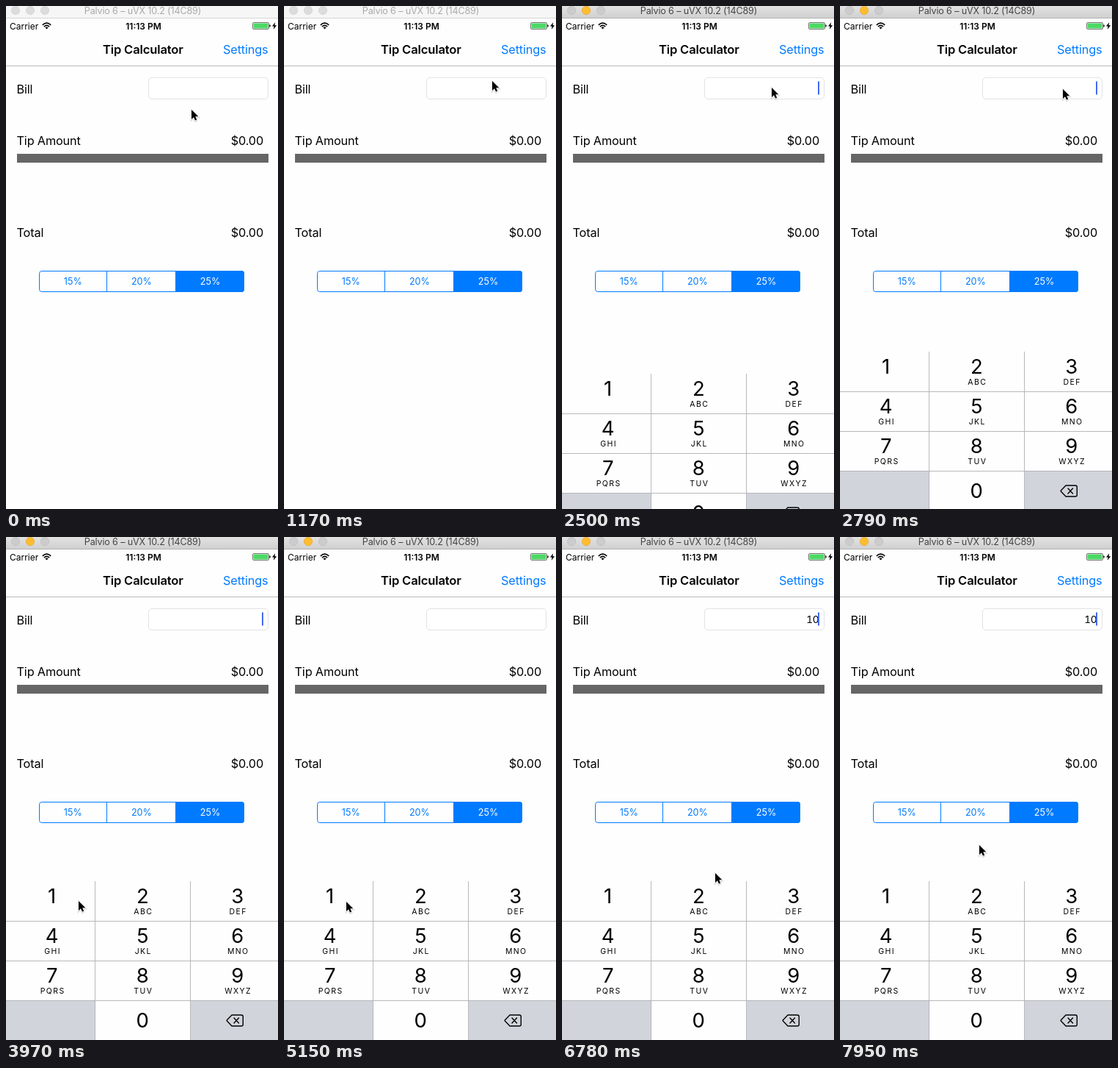
Recreate the animation shown at these times as an HTML page. Size 371 by 684 pixels, loop 8000 ms.

```html
<!DOCTYPE html>
<html lang="en">
<head>
<meta charset="utf-8">
<title>Tip Calculator</title>
<style>
  html, body { margin: 0; width: 100%; height: 100%; overflow: hidden; background: #fefefe; }
  svg { display: block; width: 371px; height: 684px; font: 16.3px Inter, "Open Sans", sans-serif; letter-spacing: -.01em; }
  .title { font-size: 12.6px; }
  .status { font-size: 12px; letter-spacing: 0; }
  .bold { font-weight: 600; }
  .nav { font-size: 16.6px; }
  .segment { font-size: 12.6px; letter-spacing: 0; }
  .field { font-size: 13.6px; font-variant-numeric: tabular-nums; }
  .digit { font-size: 27.5px; letter-spacing: 0; }
  .letters { font-size: 10.5px; letter-spacing: 1.4px; }
  .mid { text-anchor: middle; }
  .end { text-anchor: end; }
  .blue { fill: #007aff; }
</style>
</head>
<body>
<svg viewBox="0 0 371 684">
  <defs>
    <linearGradient id="chrome" x2="0" y2="1">
      <stop stop-color="#e3e2e3"/><stop offset="1" stop-color="#d1d0d1"/>
    </linearGradient>
    <path id="arrow" d="M0 0V13L3 10.200L5 14.600L7.200 13.700L5.300 9.300H9.300Z"/>
  </defs>
  <rect width="371" height="684" fill="#fefefe"/>

  <rect id="bar" width="371" height="16"/>
  <path id="barLine" d="M0 16.5H371"/>
  <g id="lights" stroke-width=".6"></g>
  <text id="title" class="title mid" x="186.5" y="11">Palvio 6 – uVX 10.2 (14C89)</text>

  <text class="status" x="5" y="31.5">Carrier</text>
  <g fill="none" stroke="#000" stroke-width="1.6">
    <path d="M49.8 25.8Q55.5 20.6 61.2 25.8M51.9 28.1Q55.5 24.8 59.1 28.1"/>
    <path d="M53.4 29.3Q55.5 27.6 57.6 29.3L55.5 31.5Z" fill="#000" stroke="none"/>
  </g>
  <text class="status bold mid" x="187.5" y="31.5">11:13 PM</text>
  <rect x="336.5" y="22.5" width="22" height="9" rx="1.5" fill="none" stroke="#555" stroke-width=".8"/>
  <rect x="337.5" y="23.5" width="20" height="7" rx=".5" fill="#4cd964"/>
  <path d="M359.3 25.3q1.6 .3 1.6 1.7t-1.6 1.7z"/>
  <path d="M367.2 22.2L363 27.6H365.6L364.8 31.8L369.2 26.2H366.5Z"/>

  <text class="bold nav mid" x="186.8" y="65">Tip Calculator</text>
  <text class="blue end" x="357.5" y="65">Settings</text>
  <path d="M0 81.5H371" stroke="#b9b9bb"/>

  <g id="rows"></g>
  <rect x="194.5" y="97.5" width="163" height="29" rx="4.5" fill="#fff" stroke="#e2e2e2"/>
  <text id="amount" class="field end" x="350.5" y="117"></text>
  <rect id="caret" x="349" y="102.5" width="2" height="18" fill="#426bf2"/>
  <rect x="15" y="201" width="343" height="12" fill="#676667"/>
  <g id="segments"></g>
  <g id="keyboard"></g>

  <g id="cursor">
    <use href="#arrow" y="1" stroke="#000" stroke-width="2.4" opacity=".14"/>
    <use href="#arrow" stroke="#fff" stroke-width="1.6" stroke-linejoin="round" paint-order="stroke"/>
  </g>
</svg>
<script>
const LOOP = 8000, STEP = 147.1;              // the picture changes once per step
const ACTIVE = 15, SHOW = 16;
const PRESSES = [{ step: 37, key: 1 }, { step: 43, key: 0 }];
const KEY_GRAY = "#d1d5db", KEY_WHITE = "#fefefe";
const KEY_TOP = 468, KEY_HEIGHT = 54;

// Places the pointer visits: arrival step, position, and the step it leaves again.
const stop = (at, x, y, leave = at) => ({ at, x, y, leave });
const STOPS = [
  stop(0, 253, 141),
  stop(2, 247, 106, 3),
  stop(6, 272, 109, 7),
  stop(10.5, 331, 76),
  stop(14, 267, 108, 15),
  stop(19, 304, 113),
  stop(27, 99, 495),
  stop(31, 85, 496, 36),
  stop(38, 94, 502, 39),
  stop(43, 174, 643, 44),
  stop(46, 209, 457, 47),
  stop(51, 183, 418),
  stop(54, 190, 419)
];

const $ = id => document.getElementById(id);
const set = (id, name, value) => $(id).setAttribute(name, value);
const clamp = v => Math.max(0, Math.min(1, v));
const ease = f => f * f * (3 - 2 * f);
const text = (cls, x, y, content, extra = "") => `<text class="${cls}" x="${x}" y="${y}" ${extra}>${content}</text>`;

function buildForm() {
  $("lights").innerHTML = [13, 33, 53].map(x => `<circle cx="${x}" cy="6" r="5.7"/>`).join("");
  $("rows").innerHTML = text("", 14.5, 118.5, "Bill") +
    [["Tip Amount", 188.5], ["Total", 313.5]].map(([label, y]) =>
      text("", 14.5, y, label) + text("end", 351, y, "$0.00")).join("");
  $("segments").innerHTML = `
    <rect x="45.5" y="360.5" width="279" height="28" rx="3.2" fill="none" stroke="#007aff"/>
    <path d="M137.5 360V389" stroke="#007aff"/>
    <path d="M231 360H321.3a3.700 3.700 0 0 1 3.700 3.700V385.300a3.700 3.700 0 0 1-3.700 3.700H231Z" class="blue"/>` +
    ["15%", "20%", "25%"].map((label, i) =>
      text("segment mid", 91.3 + 93.6 * i, 379, label, `fill="${i === 2 ? "#fff" : "#007aff"}"`)).join("");
}

function buildKeyboard() {
  const letters = ["", "ABC", "DEF", "GHI", "JKL", "MNO", "PQRS", "TUV", "WXYZ"];
  const centers = [62.7, 186.3, 315.7];
  const key = (n, row, col, label, base) => {
    const y = row * KEY_HEIGHT;
    return `<rect id="key${n}" x="${130 * col - 8}" y="${y}" width="130" height="${KEY_HEIGHT}" fill="${KEY_WHITE}"/>` +
      text("digit mid", centers[col], y + base, n) + text("letters mid", centers[col] + 1, y + 45, label);
  };
  const lines = [1, 2, 3].map(i => `M0 ${i * KEY_HEIGHT + .5}H371`).join("") + "M121.5 0V216M251.5 0V216";
  $("keyboard").innerHTML = `<rect width="371" height="216" fill="${KEY_GRAY}"/>` +
    letters.map((label, i) => key(i + 1, Math.floor(i / 3), i % 3, label, 30)).join("") +
    key(0, 3, 1, "", 37) +
    `<path d="${lines}" stroke="#b0b1b5" stroke-width=".9"/>
    <g fill="none" stroke="#000" stroke-width="1.4" stroke-linejoin="round" stroke-linecap="round">
      <path d="M308 182H321q2.300 0 2.300 2.300V194.700q0 2.300-2.300 2.300H308L301.500 190.300q-.8-.8 0-1.600Z"/>
      <path d="M311 186L317.500 193M317.500 186L311 193"/>
    </g>`;
}

function pointerAt(step) {
  const next = STOPS.findIndex(s => s.at > step);
  if (next < 0) return STOPS[STOPS.length - 1];
  const a = STOPS[next - 1], b = STOPS[next];
  const f = ease(clamp((step - a.leave) / (b.at - a.leave)));
  return { x: a.x + (b.x - a.x) * f, y: a.y + (b.y - a.y) * f };
}

// Blinks once a second; stays lit for a moment after focus and each typed digit.
function caretOpacity(step) {
  if (step < SHOW) return 0;
  const fresh = [SHOW, ...PRESSES.map(p => p.step + 1)].some(s => step >= s && step < s + 3);
  return fresh ? 1 : clamp(.2 + 2 * Math.cos(2 * Math.PI * (step * STEP / 1000 - .8)));
}

function paintChrome(active) {
  set("bar", "fill", active ? "url(#chrome)" : "#f6f6f6");
  set("barLine", "stroke", active ? "#b4b3b4" : "#d6d6d6");
  set("title", "fill", active ? "#444" : "#a9a9a9");
  [...$("lights").children].forEach((light, i) => {
    const lit = active && i === 1;
    light.setAttribute("fill", lit ? "#ffbd2e" : active ? "#cdcccd" : "#dcdcdc");
    light.setAttribute("stroke", lit ? "#e0a028" : active ? "#b9b8b9" : "#cfcfcf");
  });
}

function draw(time) {
  const step = Math.floor((time + 8) / STEP);
  paintChrome(step >= ACTIVE);
  const slide = step < SHOW ? 216 : Math.round(216 * Math.exp((2300 - step * STEP) / 105));
  set("keyboard", "transform", `translate(0 ${KEY_TOP + slide})`);
  for (const press of PRESSES)
    set("key" + press.key, "fill", step === press.step ? KEY_GRAY : KEY_WHITE);
  $("amount").textContent = PRESSES.filter(p => step > p.step).map(p => p.key).join("");
  set("caret", "opacity", caretOpacity(step));
  const { x, y } = pointerAt(step);
  set("cursor", "transform", `translate(${Math.round(x)} ${Math.round(y)})`);
}

buildForm();
buildKeyboard();
const start = performance.now();
function tick() {
  draw((performance.now() - start) % LOOP);
  requestAnimationFrame(tick);
}
tick();
</script>
</body>
</html>
```
